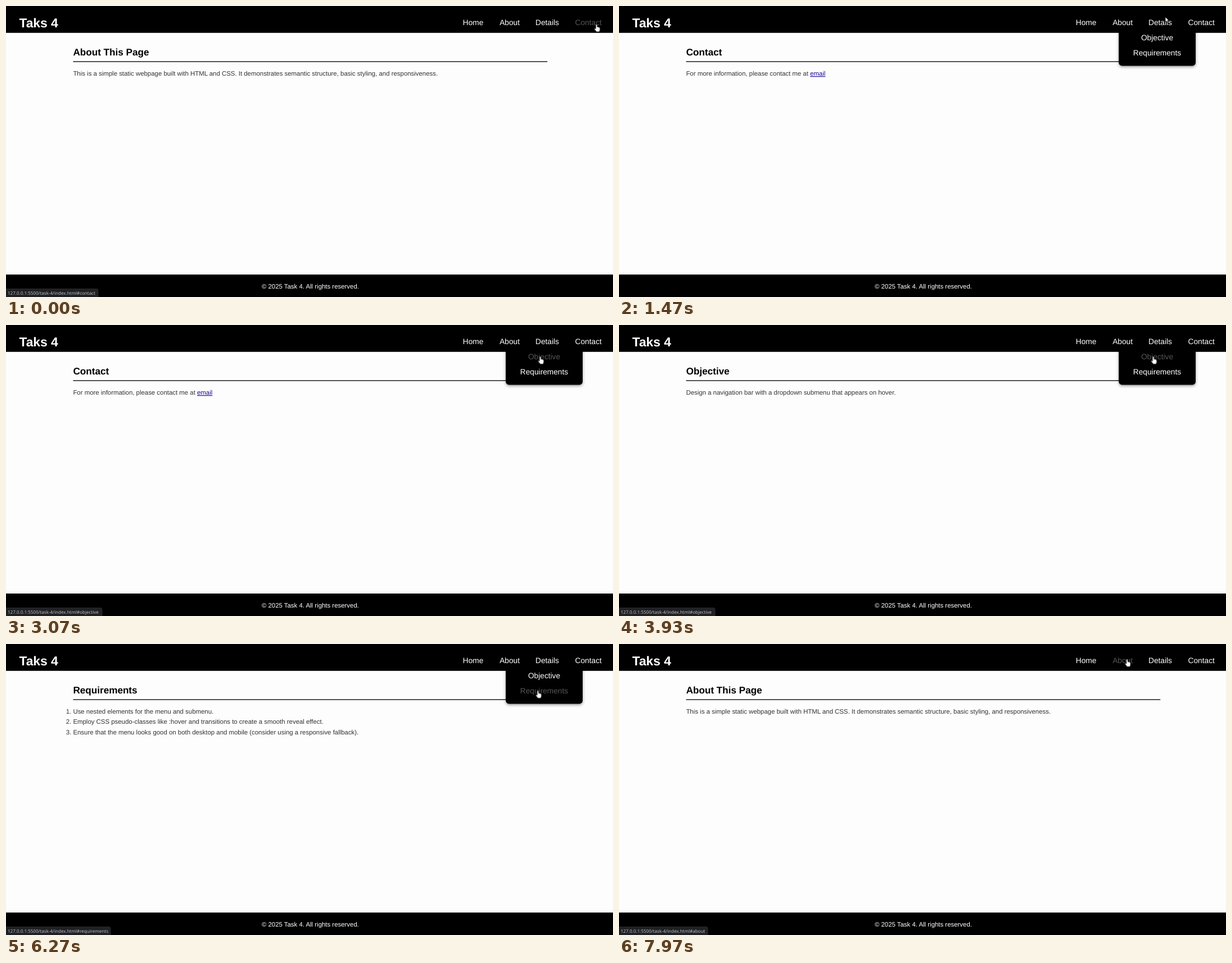
These frames come from a looping animation (1080x518 px, 8000 ms). An HTML page:

```html
<!DOCTYPE html>
<html lang="en">
<head>
<meta charset="utf-8">
<title>Dropdown navigation</title>
<style>
  html, body { margin: 0; width: 100%; height: 100%; overflow: hidden; background: #fdfdfd; }
  svg { display: block; width: 1080px; height: 518px; }
  text { font-family: "Liberation Sans", Arial, sans-serif; text-rendering: geometricPrecision; white-space: pre; }
  .brand { font-size: 22.85px; font-weight: bold; fill: #fff; }
  .nav { font-size: 13.71px; fill: #fff; }
  .mid { text-anchor: middle; }
  .head { font-size: 17.14px; font-weight: bold; fill: #000; }
  .body { font-size: 11.42px; fill: #333; }
  .foot { font-size: 11.42px; fill: #fff; }
  .link { fill: #1a0a9c; text-decoration: underline; }
  .status text { font: 8.05px "Open Sans", "Noto Sans", sans-serif; fill: #c9cacc; }
  .status path { fill: #202124; stroke: #35363a; stroke-width: .6; }
  #drop rect { filter: drop-shadow(0 2.8px 2.8px rgba(0, 0, 0, .4)); }
  #cursor path { fill: #fff; stroke: #000; stroke-width: .8; stroke-linejoin: round; }
</style>
</head>
<body>
<svg viewBox="0 0 1080 518">
  <rect width="1080" height="518" fill="#fdfdfd"/>
  <g id="pages"></g>
  <rect x="119.4" y="98.3" width="843.8" height="1.43" fill="#111"/>
  <g id="drop">
    <rect x="889.2" y="38" width="136.8" height="68.4" rx="5.7"/>
    <text id="objective" class="nav mid" x="957.5" y="61">Objective</text>
    <text id="requirements" class="nav mid" x="957.5" y="88.2">Requirements</text>
  </g>
  <rect width="1080" height="47.8"/>
  <text class="brand" x="23.4" y="37.6">Taks 4</text>
  <text class="nav" x="812.8" y="34.3">Home</text>
  <text id="about" class="nav" x="878.2" y="34.3">About</text>
  <text class="nav" x="942" y="34.3">Details</text>
  <text id="contact" class="nav" x="1012.6" y="34.3">Contact</text>
  <rect y="478" width="1080" height="40"/>
  <text class="foot mid" x="541.4" y="502.6">© 2025 Task 4. All rights reserved.</text>
  <g id="bubbles"></g>
  <g id="cursor">
    <path id="arrow" d="M0 0V9.2L2.1 7.3 3.6 10.6 5.2 9.9 3.7 6.7H6.6Z"/>
    <path id="hand" d="M-1.3 .8Q-1.3-.6 0-.6T1.3 .8V4.2Q2.6 3.6 3.2 4.7Q4.6 4.2 5 5.3Q6.2 5.1 6.2 6.6V9Q6.2 11 5 13H-.2Q-1.5 10.8-3.6 8.4Q-4.2 7-3 6.7Q-2 6.6-1.3 7.8Z"/>
  </g>
</svg>
<script>
const LOOP = 8000, FADE = 300;
const $ = id => document.getElementById(id);

const pages = {
  about: ["About This Page", "This is a simple static webpage built with HTML and CSS. It demonstrates semantic structure, basic styling, and responsiveness."],
  contact: ["Contact", 'For more information, please contact me at <tspan class="link">email</tspan>'],
  objective: ["Objective", "Design a navigation bar with a dropdown submenu that appears on hover."],
  requirements: ["Requirements",
    "Use nested elements for the menu and submenu.",
    "Employ CSS pseudo-classes like :hover and transitions to create a smooth reveal effect.",
    "Ensure that the menu looks good on both desktop and mobile (consider using a responsive fallback)."]
};
const bubbleWidth = { about: 158, contact: 164, objective: 171, requirements: 186 };

for (const [id, [title, ...lines]] of Object.entries(pages)) {
  const rows = lines.map((line, i) => {
    const y = 124 + i * 18.25;
    const mark = lines.length > 1 ? `<text class="body" x="106.7" y="${y}">${i + 1}.</text>` : "";
    return `${mark}<text class="body" x="119.4" y="${y}">${line}</text>`;
  });
  $("pages").innerHTML += `<g id="page-${id}"><text class="head" x="119.4" y="87.7">${title}</text>${rows.join("")}</g>`;
  $("bubbles").innerHTML += `<g id="status-${id}" class="status"><path d="M-1 503.5H${bubbleWidth[id] - 3}q3 0 3 3V519H-1Z"/>` +
    `<text x="3" y="514.2">127.0.0.1:5500/task-4/index.html#${id}</text></g>`;
}

// Each step is [time, value, easing]; values hold until the next step unless eased.
function play(id, prop, steps) {
  const last = steps[steps.length - 1];
  const frames = [...steps, [LOOP, last[1]]].map(([t, value, easing = "step-end"]) =>
    ({ offset: t / LOOP, [prop]: value, easing }));
  $(id).animate(frames, { duration: LOOP, iterations: Infinity }).startTime = start;
}

// Visible only during the given [from, to] spans.
function show(id, ...spans) {
  const steps = spans[0][0] > 0 ? [[0, 0]] : [];
  for (const [from, to] of spans) {
    steps.push([from, 1]);
    if (to < LOOP) steps.push([to, 0]);
  }
  play(id, "opacity", steps);
}

const WHITE = "#ffffff", DIM = "#555555";
const dim = t => [[t, WHITE, "ease"], [t + FADE, DIM]];
const undim = t => [[t, DIM, "ease"], [t + FADE, WHITE]];
const at = (x, y) => `translate(${x}px, ${y}px)`;

const start = document.timeline.currentTime || 0;

show("page-about", [0, 300], [7650, LOOP]);
show("page-contact", [300, 3500]);
show("page-objective", [3500, 4900]);
show("page-requirements", [4900, 7650]);

play("contact", "fill", [[0, DIM], ...undim(610)]);
play("objective", "fill", [[0, WHITE], ...dim(2480), ...undim(4400)]);
play("requirements", "fill", [[0, WHITE], ...dim(4450), ...undim(6980)]);
play("about", "fill", [[0, WHITE], ...dim(7200)]);

show("drop", [630, 7120]);

play("status-contact", "opacity", [[0, 1], [900, 1, "linear"], [1100, 0]]);
play("status-objective", "opacity", [[0, 0], [2600, 0, "linear"], [2720, 1], [4470, 0]]);
show("status-requirements", [4470, 7220]);
show("status-about", [7220, LOOP]);

play("cursor", "transform", [
  [0, at(1050.6, 33)],
  [480, at(1050.6, 33), "ease-in-out"],
  [660, at(972, 19.4)],
  [1500, at(972, 19.4), "ease-in-out"],
  [1680, at(971, 25)],
  [2280, at(971, 25), "ease-in-out"],
  [2540, at(951.6, 51.5)],
  [2600, at(951.6, 51.5), "ease-out"],
  [2800, at(950.6, 56.6)],
  [4300, at(950.6, 56.6), "ease-in-out"],
  [4550, at(946.4, 83.4)],
  [6880, at(946.4, 83.4), "ease-in-out"],
  [7300, at(904, 27.4)]
]);
show("hand", [0, 610], [2480, 4400], [4450, 4840], [4900, 6980], [7200, LOOP]);
show("arrow", [610, 2480], [4400, 4450], [4840, 4900], [6980, 7200]);
</script>
</body>
</html>
```
